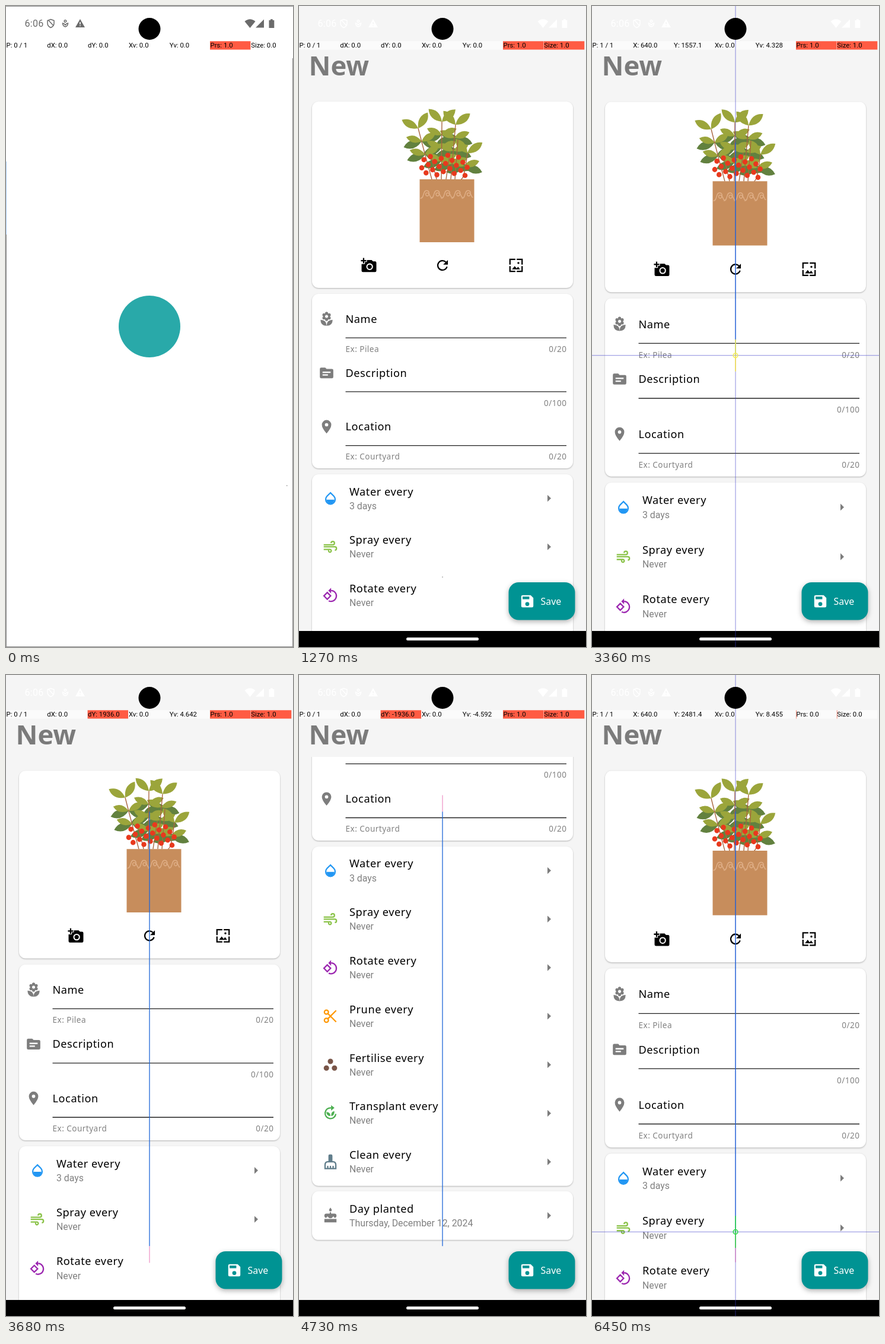
An HTML page for the animation above (6500 ms loop, 484 px wide and 1080 px high).

```html
<!DOCTYPE html>
<html lang="en">
<head>
<meta charset="utf-8">
<title>New plant form</title>
<style>
html, body { margin: 0; width: 100%; height: 100%; overflow: hidden; background: #f5f5f5; }
svg { display: block; width: 100vw; height: 100vh; }
text { white-space: pre; }
.title { font: 18.15px "Noto Sans", "Open Sans", sans-serif; letter-spacing: .57px; }
.hint { font: 13.6px "Noto Sans", "Open Sans", sans-serif; letter-spacing: .45px; fill: #828282; }
.sub { font: 15.88px Roboto, sans-serif; fill: #808080; }
.cell { font: 11.34px Roboto, sans-serif; }
.head { font: 700 45.36px "Noto Sans", "Open Sans", sans-serif; fill: #7b7b7b; }
.save { font: 500 15.9px "Noto Sans", "Open Sans", sans-serif; fill: #fff; }
.card { fill: #fff; filter: drop-shadow(0 1.2px 1.3px rgba(0,0,0,.27)); }
</style>
</head>
<body>
<svg id="stage" viewBox="0 0 484 1080"></svg>
<script>
const LOOP = 6500, PX = 484 / 1280, SLOP = 14.4, MAX_SCROLL = 499, TOP = 138, BOTTOM = 1053;
const clamp = (v, a = 0, b = 1) => Math.min(b, Math.max(a, v));
const range = n => [...Array(n).keys()];

const ring = (x, y, r) => `M${x - r} ${y}a${r} ${r} 0 1 0 ${2 * r} 0a${r} ${r} 0 1 0 ${-2 * r} 0`;
const petals = range(6).map(i => ring(12 + 4.5 * Math.sin(i * Math.PI / 3), 8 - 4.5 * Math.cos(i * Math.PI / 3), 2.3)).join('');

// Each icon on a 24 unit grid: filled part, stroked part
const ICONS = {
  camera: ['M9 4H16L18 6H21q2 0 2 2V20q0 2-2 2H3q-2 0-2-2V10H6V7H9z' + ring(13, 14, 5) + ring(13, 14, 3.2), 'M4 1V9M0 5H8'],
  refresh: ['M13 11H20V4z', 'M17 7.1A7 7 0 1 0 18.7 14'],
  picture: ['M10 13L6 18H18L15 14L13 16.7z' + ring(15.5, 8.5, 1.5), 'M11 3H3V11M13 3H21V11M3 13V21H11M21 13V21H13'],
  flower: [petals + 'M3 13q0 9 9 9q0-9-9-9zM21 13q0 9-9 9q0-9 9-9z', ring(12, 8, 3.4)],
  folder: ['M4 4H10L12 6H20q2 0 2 2V18q0 2-2 2H4q-2 0-2-2V6q0-2 2-2zM6 10H18V12H6zM6 14H14V16H6z', ''],
  pin: ['M12 22Q5 14 5 9A7 7 0 0 1 19 9Q19 14 12 22z' + ring(12, 9, 2.5), ''],
  drop: ['M6 14A6 6 0 0 0 18 14z', 'M12 3.8L7 8.7A7 7 0 1 0 17 8.7z'],
  wind: ['', 'M2 9H15.5A2.5 2.5 0 1 0 13 6.5M2 12H18.5a2.5 2.5 0 0 1 0 5M2 16H11.5a2 2 0 1 1-2 1'],
  rotate: ['M13 .8V9.2L8.8 5z', 'M2.3 12.9L7.3 7.9L12.3 12.9L7.3 17.9zM13 5A8 8 0 1 1 9.4 20.2'],
  scissors: ['', ring(6, 6, 3) + ring(6, 18, 3) + 'M8 8L20.5 20.5M8 16L20.5 3.5'],
  dots: [ring(12, 7, 4) + ring(6, 17, 4) + ring(18, 17, 4), ''],
  cycle: ['M13 0V8L18 4zM6 10q6 0 6 6q-6 0-6-6zM18 9q0 7-5 7q0-7 5-7z', 'M20 13A8 8 0 1 1 13 4'],
  brush: ['M9 12V3q0-2 2-2h2q2 0 2 2V12z', 'M4 22V17Q4 12 8 12H16Q20 12 20 17V22zM8 22V18M12 22V18M16 22V18'],
  cake: ['M12 0L13.8 3A2 2 0 1 1 10.2 3zM3 13V12q0-3 3-3H11V7H13V9H18q3 0 3 3V13q-2 5-4.500 0q-4.500 6-9 0q-2.500 5-4.500 0zM3 17H21V22H3z', ''],
  save: ['M5 3H17L21 7V19q0 2-2 2H5q-2 0-2-2V5q0-2 2-2zM5 5H15V9H5z' + ring(12, 16, 3), '']
};
const icon = (name, x, y, color) =>
  `<g transform="translate(${x - 13.6} ${y - 13.6}) scale(1.134)"><path d="${ICONS[name][0]}" fill="${color}" fill-rule="evenodd"/>` +
  `<path d="${ICONS[name][1]}" fill="none" stroke="${color}" stroke-width="2"/></g>`;
const card = (y, bottom) => `<rect class="card" x="22" y="${y}" width="440" height="${bottom - y}" rx="11"/>`;
const text = (cls, x, y, s, more = '') => `<text class="${cls}" x="${x}" y="${y}" ${more}>${s}</text>`;

function leaf(x, y, side, angle, length) {
  const dx = side * length * Math.cos(angle), dy = -length * Math.sin(angle);
  const bend = k => `${x + dx * .55 - dy * k} ${y + dy * .55 + dx * k}`;
  return `M${x} ${y}Q${bend(.42)} ${x + dx} ${y + dy}Q${bend(-.42)} ${x} ${y}`;
}

// Leaf pairs every 22 px down each stem: the tip pair points up, lower pairs spread and droop
function plant() {
  let stems = '', light = '', dark = '', wave = '';
  for (const [base, x, y] of [[224, 201, 206], [240, 241, 195], [256, 264, 200], [273, 284, 248]]) {
    stems += `M${base} 292Q${(base + x) / 2} ${y + 45} ${x} ${y}`;
    for (let j = 0; y + j * 22 < 272; j++) {
      const ny = y + j * 22, nx = x + (base - x) * j * 22 / (292 - y);
      for (const side of [-1, 1]) {
        const lean = side * (base - x) * .012;
        light += leaf(nx, ny, side, j ? .4 + lean / 2 : .75 + lean, 31 - (j && 4));
        if (j) dark += leaf(nx, ny, side, -.32, 32);
      }
    }
  }
  const berries = range(22).map(i => ring(207 + i * 3.65, 251 + 36 * ((i * .618 + .6) % 1), 4.3)).join('');
  for (const i of range(5))
    wave += `M${204.5 + i * 17.5} 324c7 1 4-14 11-13c6 1 4 10 0 9c-4-2-1-8 3-4s2 7 5 6`;
  return `<path d="${dark}" fill="#62813f"/><path d="${light}" fill="#9ba53b"/>
    <path d="${stems}M232 292L222 250M248 292L255 245M263 292L268 225" fill="none" stroke="#a9663f" stroke-width="1.4"/>
    <path d="${berries}" fill="#e8391d"/><path d="M203.5 292h92v106h-92z" fill="#c78d5c"/>
    <path d="${wave}" fill="none" stroke="#dfae86" stroke-width="1.5"/>`;
}

function field(i, name, glyph, hint, count) {
  const y = 527.5 + i * 90.7;
  return icon(glyph, 46.5, y, '#7d7d7d') + text('title', 78.5, y + 6.5, name) +
    `<path d="M78.5 ${y + 31.7}h372.5" stroke="#222" stroke-width="1.3"/>` +
    text('hint', 78.5, y + 55.5, hint) + text('hint', 451.4, y + 55.5, count, 'text-anchor="end"');
}

function row(y, name, sub, glyph, color) {
  return icon(glyph, 53, y, color) + text('title', 85, y - 5, name) + text('sub', 85, y + 18, sub) +
    `<path d="M419 ${y - 5.7}l6 5.7l-6 5.7z" fill="#7d7d7d"/>`;
}

const TASKS = [['Water', 'drop', '#2196f3'], ['Spray', 'wind', '#8bc34a'], ['Rotate', 'rotate', '#9c27b0'],
  ['Prune', 'scissors', '#ff9800'], ['Fertilise', 'dots', '#795548'], ['Transplant', 'cycle', '#4caf50'], ['Clean', 'brush', '#607d8b']];
const cells = range(7).map(i => i * 68.8);

const stage = document.getElementById('stage');
stage.innerHTML = `
<clipPath id="view"><path d="M0 ${TOP}H484V${BOTTOM}H0z"/></clipPath>
<path d="M0 0H484V1080H0z" fill="#f5f5f5"/>
<g id="page">
  ${text('head', 16.5, 116.5, 'New')}
  <g clip-path="url(#view)"><g id="list">
    ${card(161, 475)}${plant()}
    ${icon('camera', 118, 437, '#000')}${icon('refresh', 242, 437, '#000')}${icon('picture', 366, 437, '#000')}
    ${card(485, 779)}
    ${field(0, 'Name', 'flower', 'Ex: Pilea', '0/20')}
    ${field(1, 'Description', 'folder', '', '0/100')}
    ${field(2, 'Location', 'pin', 'Ex: Courtyard', '0/20')}
    ${card(789, 1360)}
    ${TASKS.map(([name, glyph, color], i) => row(829.5 + i * 81.67, name + ' every', i ? 'Never' : '3 days', glyph, color)).join('')}
    ${card(1369, 1451)}${row(1410, 'Day planted', 'Thursday, December 12, 2024', 'cake', '#7d7d7d')}
  </g></g>
  <rect x="353.5" y="971" width="112" height="63.5" rx="17" fill="#009393" style="filter:drop-shadow(0 3px 4px rgba(0,0,0,.3))"/>
  ${icon('save', 385, 1003, '#fff')}${text('save', 407.5, 1008.5, 'Save')}
</g>
<path d="M0 ${BOTTOM}H484V1080H0z"/><rect x="181" y="1064" width="122" height="5" rx="2.5" fill="#fff"/>
<g id="splash">
  <path d="M0 0H484V1080H0z" fill="#fff"/>
  <path d="M.5 385V1080M0 .5H484M483.5 88V1080M0 1079.5H484" stroke="#8c8c8c"/>
  <path d="M.5 262V385" stroke="#a9cdf5"/>
  <circle cx="242" cy="540" r="52" fill="#29a9a9"/>
</g>
<g id="status" fill="currentColor">
  <text x="31.5" y="35" font-family="Roboto, sans-serif" font-size="16" letter-spacing=".3">6:06</text>
  <path d="M75.5 22.500l5.500 2v4.500q0 5-5.500 7.500q-5.500-2.500-5.500-7.500v-4.500zM72 24.500L80 33M95.500 29q3 .5 4.500 3q1.500-2.500 4.500-3q0 4.500-4.500 6q-4.500-1.500-4.500-6z${ring(100, 25.5, 1.8)}" fill="none" stroke="currentColor" stroke-width="1.500"/>
  <path d="M125 22l8 14h-16zM124.2 27v4h1.6v-4zM124.2 32.5v1.6h1.6v-1.6z" fill-rule="evenodd"/>
  <path d="M402.5 26q9-7.5 18 0l-9 11zM421 36.5l14-14v14zM443.5 24h2.5v-1.8h3.8v1.8h2.5v13h-8.8z"/>
</g>
${cells.map(x => `<rect x="${x}" y="59.3" width="68.5" height="14.2" fill="#fff" opacity=".6"/><rect class="bar" x="${x}" y="59.3" height="14.2" fill="#ff5b43"/>`).join('')}
${cells.map(x => text('cell out', x + .5, 70.3, '')).join('')}
<g id="touch" fill="none">
  <path id="cross" stroke="#3c3cc8" stroke-opacity=".6"/>
  <path id="trace" stroke="#1f66d8" stroke-width="1.3"/>
  <path id="speed" stroke="#e0409a" stroke-opacity=".7"/>
  <path id="finger" d="M0-27V27${ring(0, 0, 3.8)}" stroke-width="1.6"/>
</g>
<path id="dot" fill="#777"/>
<circle cx="242" cy="38.5" r="18.5"/>`;

const set = (id, name, value) => document.getElementById(id).setAttribute(name, value);
const bars = stage.querySelectorAll('.bar'), outs = stage.querySelectorAll('.out');

// Swipes: start, duration, from y, to y, pressure; the finger rests briefly before moving
const HIGH = 609, LOW = 2545, REST = 30;
const SWIPES = [
  [1415, 458, LOW, HIGH, 1],
  [2170, 306, HIGH, 1902, 1],
  [2520, 180, 785, LOW, 1],
  [3137.5, 456.4, HIGH, LOW, 1],
  [4088, 461.4, LOW, HIGH, 1],
  [5220, 456, HIGH, LOW, 1],
  [6209.7, 249.5, HIGH, LOW, 0]
];

function touchAt(t) {
  let scroll = 0, stretch = 0, swipe = null;
  for (const [start, time, from, to, pressure] of SWIPES) {
    if (t < start - REST) break;
    const p = clamp((t - start) / time), move = (to - from) * p, late = t - start - time;
    const raw = scroll - Math.sign(move) * Math.max(0, Math.abs(move) * PX - SLOP);
    scroll = clamp(raw, 0, MAX_SCROLL);
    const over = (raw - scroll) / (BOTTOM - TOP), n = Math.abs(over);
    stretch = Math.sign(over) * (.0105 * n + .0185 * (1 - Math.exp(-8.24 * n))) * Math.exp(-Math.max(0, late) / 70);
    const speed = p && (to - from) / time * (.949 + .1454 * p);
    swipe = { down: late < 0, from, y: from + move, move, speed, pressure };
  }
  return { scroll, stretch, swipe };
}

function drawTouch(s) {
  set('touch', 'visibility', s ? 'visible' : 'hidden');
  if (!s) return;
  const y = s.y * PX;
  set('cross', 'd', s.down ? `M242 0V1080M0 ${y}H484` : '');
  set('trace', 'd', `M242 ${s.from * PX}V${y}`);
  set('speed', 'd', `M242 ${y}v${s.speed * 16 * PX}`);
  set('finger', 'transform', `translate(242 ${y})`);
  set('finger', 'stroke', !s.down ? 'none' : !s.pressure ? '#2fd84a' : s.move ? '#f4ee55' : '#ffe100');
}

function drawCells(t, s) {
  const pressure = s ? s.pressure : 1, size = s ? s.pressure : +(t > 700);
  const delta = s && !s.down ? s.move : 0, speed = s ? s.speed : 0;
  const place = s && s.down
    ? ['P: 1 / 1', 'X: 640.0', 'Y: ' + s.y.toFixed(1)]
    : ['P: 0 / 1', 'dX: 0.0', 'dY: ' + delta.toFixed(1)];
  const values = [...place, 'Xv: 0.0', 'Yv: ' + (speed ? speed.toFixed(3) : '0.0'),
    'Prs: ' + pressure.toFixed(1), 'Size: ' + size.toFixed(1)];
  const fills = [0, 0, delta && 1, 0, 0, pressure || .01, size || (s ? .01 : 0)];
  values.forEach((value, i) => {
    outs[i].textContent = value;
    bars[i].setAttribute('width', 68.5 * Math.min(1, Math.abs(fills[i])));
  });
}

function draw(t) {
  if (t > 2640 && t < 2820) t = 2640;
  const { scroll, stretch, swipe } = touchAt(t);
  const anchor = stretch > 0 ? BOTTOM : TOP;
  set('list', 'transform', `translate(0 ${anchor}) scale(1 ${1 + Math.abs(stretch)}) translate(0 ${-anchor - scroll})`);

  const enter = 1 - (1 - clamp((t - 680) / 330)) ** 3;
  set('page', 'opacity', enter);
  set('page', 'transform', `translate(0 ${40 * (1 - enter)})`);
  set('splash', 'opacity', 1 - clamp((t - 380) / 220));
  set('status', 'color', t < 500 ? '#6b6b6b' : '#fff');

  const dot = t < 700 ? [473, 807.5] : t >= 1270 && !swipe ? [241.3, 961.5] : null;
  set('dot', 'd', dot ? `M${dot}h1.4v1.3h-1.4z` : '');
  drawCells(t, swipe);
  drawTouch(swipe);
}

(function frame() {
  draw(performance.now() % LOOP);
  requestAnimationFrame(frame);
})();
</script>
</body>
</html>
```
